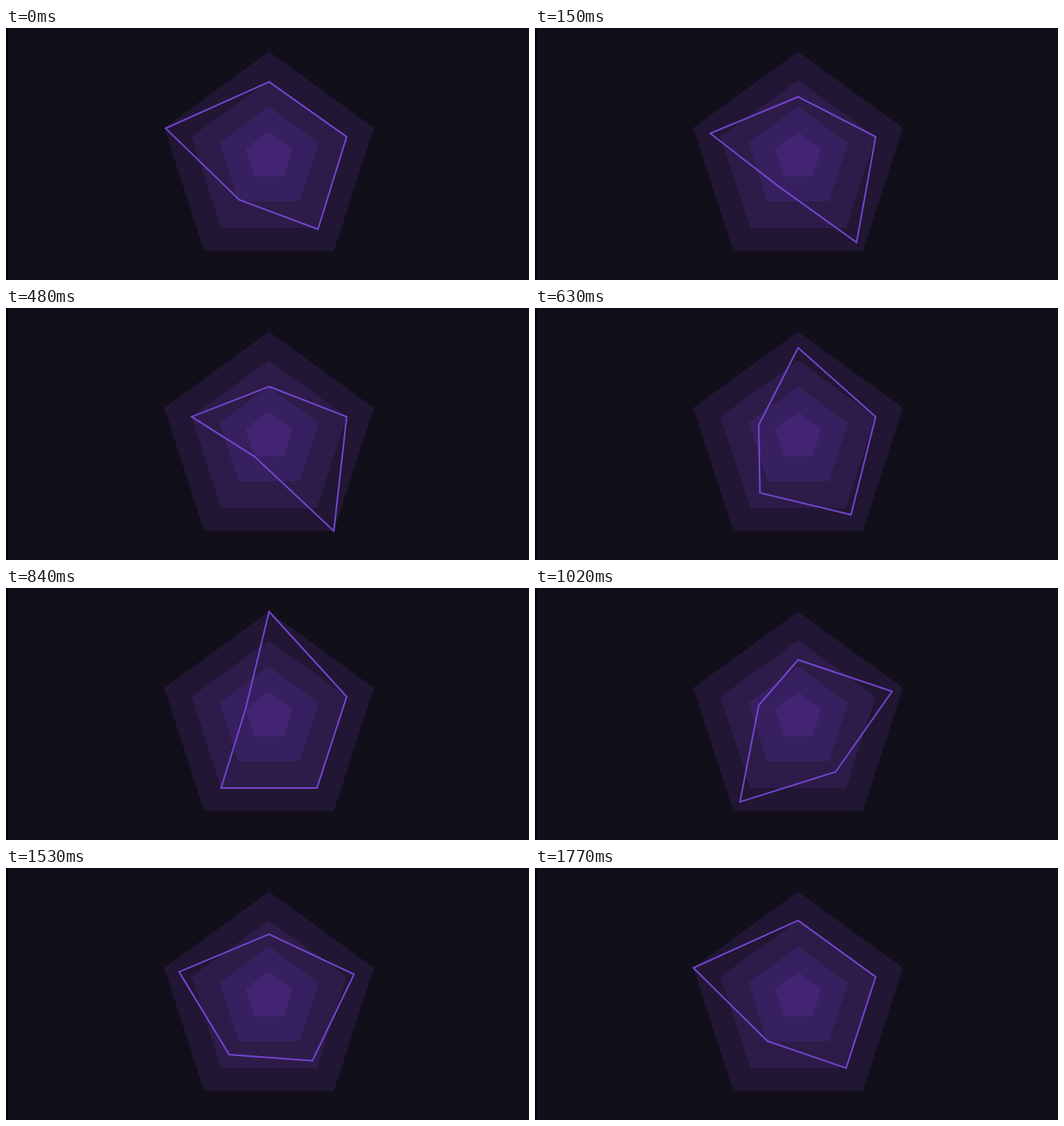
Recreate the animation shown at these times as an HTML page. Size 664 by 320 pixels, loop 1800 ms.

```html
<!DOCTYPE html>
<html>
<head>
<meta charset="utf-8">
<style>
  html, body { margin: 0; width: 100%; height: 100%; overflow: hidden; background: #110f1a; }
  svg { display: block; }
</style>
</head>
<body>
<svg width="664" height="320" viewBox="0 0 664 320">
  <rect width="2" height="320" fill="#000"/>
  <g id="grid"></g>
  <polygon id="chart" fill="none" stroke="#7545d0" stroke-width="2"/>
</svg>
<script>
const LOOP = 1800, CX = 334;

// Rings from outside in: radius, centre y, fill
const rings = [
  [140, 170, '#211633'],
  [103.6, 170.1, '#2d1c49'],
  [66.3, 166.3, '#37205f'],
  [31.3, 163, '#432473']
];

// Poses: start time and the ring each spoke rests on, clockwise from the top
const poses = [
  { at: -35, on: [1, 1, 1, 2, 0] },
  { at: 478, on: [2, 1, 0, 3, 1] },
  { at: 845, on: [0, 1, 1, 1, 3] },
  { at: 1350, on: [3, 0, 2, 0, 2] },
  { at: 1765, on: [1, 1, 1, 2, 0] }
];

const corner = (ring, spoke) => {
  const [r, cy] = rings[ring], a = spoke * Math.PI * 2 / 5;
  return [CX + r * Math.sin(a), cy - r * Math.cos(a)];
};

// cubic-bezier(.25, .1, .25, 1), solved by bisection
const bezier = (s, p, q) => 3 * (1 - s) * (1 - s) * s * p + 3 * (1 - s) * s * s * q + s * s * s;
function ease(x) {
  let lo = 0, hi = 1;
  for (let i = 0; i < 24; i++) {
    const mid = (lo + hi) / 2;
    if (bezier(mid, .25, .25) < x) lo = mid; else hi = mid;
  }
  return bezier(lo, .1, 1);
}

const spokes = [0, 1, 2, 3, 4];
const grid = document.getElementById('grid');
const chart = document.getElementById('chart');

grid.innerHTML = rings.map(([, , fill], ring) =>
  `<polygon fill="${fill}" points="${spokes.map(s => corner(ring, s)).join(' ')}"/>`).join('');

function draw(now) {
  let t = now % LOOP;
  if (t >= poses[4].at) t -= LOOP;
  const i = poses.findIndex((pose, k) => t < poses[k + 1].at);
  const from = poses[i], to = poses[i + 1];
  const k = ease((t - from.at) / (to.at - from.at));
  chart.setAttribute('points', spokes.map(s => {
    const a = corner(from.on[s], s), b = corner(to.on[s], s);
    return a.map((v, j) => v + (b[j] - v) * k);
  }).join(' '));
}

const start = performance.now();
function tick() {
  draw(performance.now() - start);
  requestAnimationFrame(tick);
}
tick();
</script>
</body>
</html>
```
